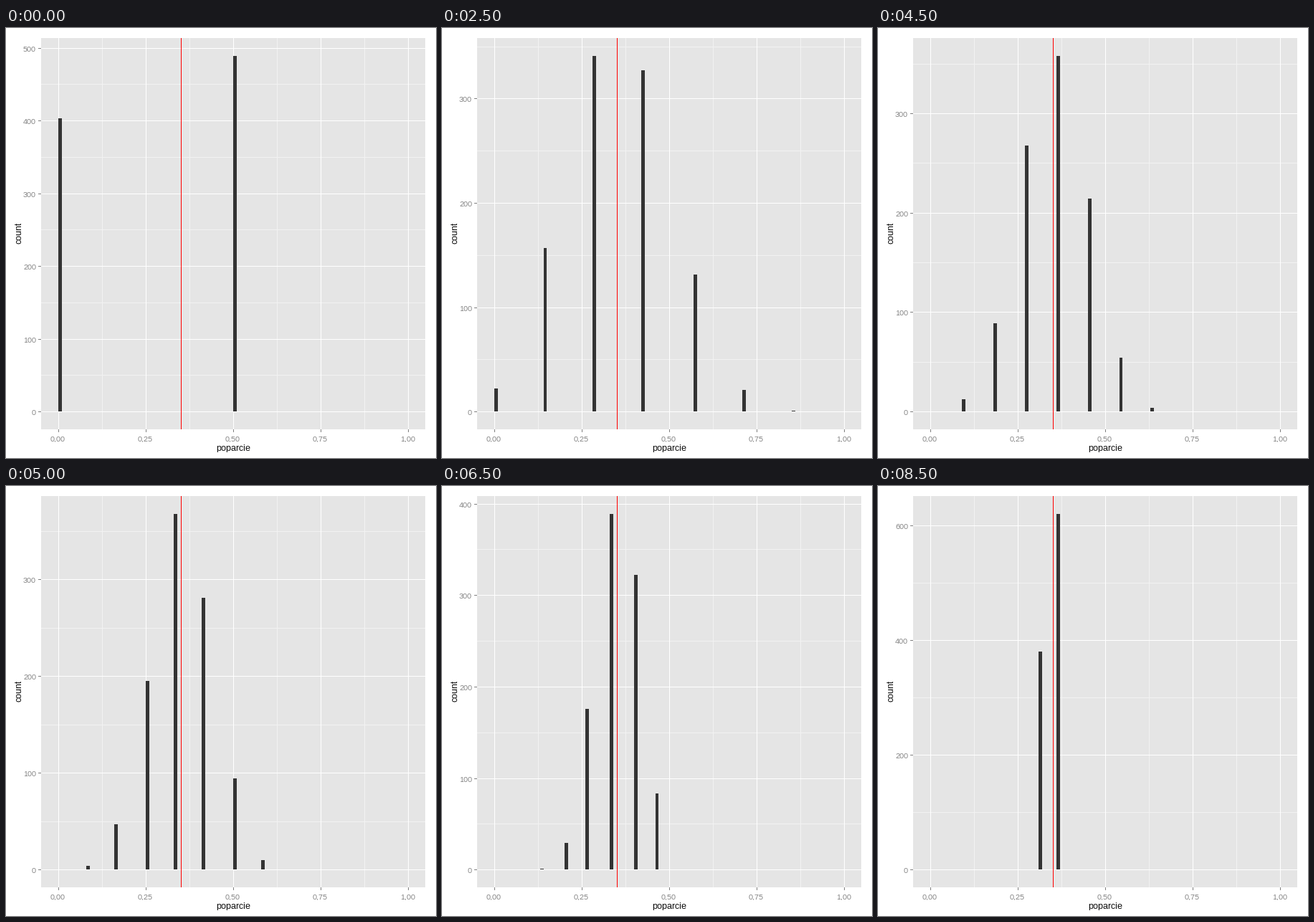
A matplotlib script that plays this animation: 600 px wide and 600 px high, repeating every 9000 ms.

```python
from math import comb, floor

import matplotlib.pyplot as plt
from matplotlib.animation import FuncAnimation
from matplotlib.patches import Rectangle

SIZE = 600
LEFT, RIGHT, TOP, BOTTOM = 49, 585, 14, 560
ZERO_X, SPAN_X = 73.23, 487.7
ZERO_Y, SPAN_Y = 535.63, 496.4
PANEL, MINOR, GREY, BAR = "#E5E5E5", "#F2F2F2", "#7F7F7F", "#333333"

# Each sample of n is drawn 1000 times from 20 items, 7 of them hits.
DRAWS, ITEMS, HITS = 1000, 20, 7
# Height of the tallest bar for n = 2, 3, ... 19
PEAKS = [489, 470, 400, 382, 381, 341, 358, 384, 325,
         358, 368, 349, 398, 389, 413, 472, 472, 620]

plt.rcParams.update({"font.family": "Liberation Sans",
                     "text.hinting": "native", "text.hinting_factor": 1})
fig = plt.figure(figsize=(6, 6), dpi=100, facecolor="white")
ax = fig.add_axes([0, 0, 1, 1])
ax.set_xlim(0, SIZE)
ax.set_ylim(SIZE, 0)
ax.axis("off")


def box(x0, y0, x1, y1, color, z):
    return ax.add_patch(Rectangle((x0, y0), x1 - x0, y1 - y0, facecolor=color,
                                  linewidth=0, antialiased=False, zorder=z))


def label(x, y, text, px, color, ha="center", **kw):
    return ax.text(x, y, text, fontsize=px * 0.72, color=color,
                   ha=ha, va="baseline", zorder=6, **kw)


def counts(n):
    """Hypergeometric bar heights {hits: count}, fitted to the tallest bar."""
    ways = {k: comb(HITS, k) * comb(ITEMS - HITS, n - k)
            for k in range(min(HITS, n) + 1)}
    mode = max(ways, key=ways.get)
    peak = PEAKS[n - 2]
    rest = (DRAWS - peak) / (comb(ITEMS, n) - ways[mode])
    heights = {k: peak if k == mode else round(w * rest) for k, w in ways.items()}
    # A share of exactly 1 falls outside the axis
    return {k: c for k, c in heights.items() if c and k < n}


def static_parts():
    box(LEFT, TOP, RIGHT, BOTTOM, PANEL, 0)
    for i in range(9):
        x = 73 + 61 * i
        major = i % 2 == 0
        box(x, TOP, x + 1, BOTTOM, "white" if major else MINOR, 2 if major else 1)
        if major:
            box(x, BOTTOM, x + 1, BOTTOM + 4, GREY, 2)
            label(x - 0.5, 577, f"{i / 8:.2f}".replace(".", ","), 10, GREY)
    box(244, TOP, 245, BOTTOM, "red", 5)
    label(317, 590, "poparcie", 12, "black")
    label(21, 286, "count", 12, "black", rotation=90, rotation_mode="anchor")


moving = []


def draw(frame):
    while moving:
        moving.pop().remove()
    n = frame + 2
    data = counts(n)
    peak = max(data.values())
    step = 200 if peak > 550 else 100

    def to_y(value):
        return floor(ZERO_Y - SPAN_Y * value / peak)

    for value in range(0, floor(peak * 1.05) + 1, step // 2):
        y = to_y(value)
        if value % step == 0:
            moving.append(box(LEFT, y, RIGHT, y + 1, "white", 2))
            moving.append(box(LEFT - 4, y, LEFT, y + 1, GREY, 2))
            moving.append(label(42, y + 5, str(value), 10, GREY, ha="right"))
        else:
            moving.append(box(LEFT, y, RIGHT, y + 1, MINOR, 1))

    for k, c in data.items():
        edge = (100 * k // n) / 100
        x0 = round(ZERO_X + SPAN_X * edge)
        x1 = round(ZERO_X + SPAN_X * (edge + 0.01))
        moving.append(box(x0, to_y(c), x1, to_y(0), BAR, 4))
    return moving


static_parts()
anim = FuncAnimation(fig, draw, frames=18, interval=500, init_func=lambda: draw(0),
                     repeat=True, repeat_delay=0, blit=False)
plt.show()
```
